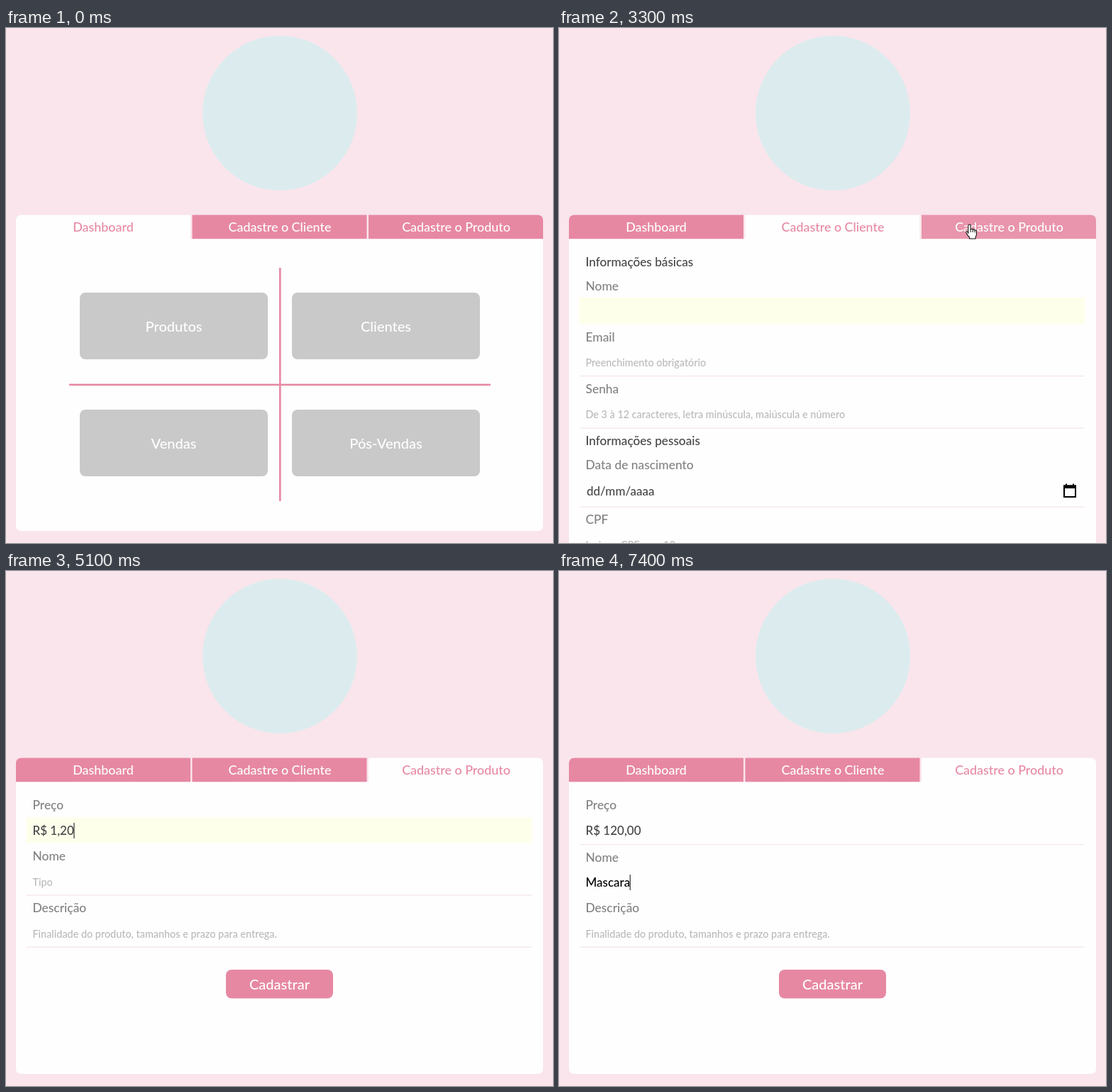
Animation of 771 by 726 pixels, one loop 8 s. Source, as an HTML page:

```html
<!DOCTYPE html>
<html lang="pt-BR">
<head>
<meta charset="utf-8">
<title>Cadastro</title>
<style>
  html, body { margin: 0; width: 100%; height: 100%; overflow: hidden; background: #fae5ec; }
  svg { display: block; width: 771px; height: 726px; }
  text { font-family: Lato, "Open Sans", sans-serif; font-size: 17.2px; font-weight: 500; white-space: pre; }
  .tab text { font-size: 17.9px; text-anchor: middle; }
  .big { font-size: 20px; text-anchor: middle; fill: #fff; }
  .head { fill: #444; }
  .label { fill: #828282; font-size: 17.4px; }
  .hint { fill: #b9b9b9; font-size: 14.4px; }
  .value { fill: #444; font-size: 17px; }
  .rule { fill: #f8e8ee; }
  .focus { fill: #feffeb; }
  .pink { fill: #e788a3; }
</style>
</head>
<body>
<svg id="stage" viewBox="0 0 771 726" xmlns="http://www.w3.org/2000/svg"></svg>
<script>
const LOOP = 8000, STEP = 100;
const PINK = '#e788a3', WHITE = '#fefefe';
const stage = document.getElementById('stage');

function add(parent, tag, attrs = {}, content) {
  const el = document.createElementNS('http://www.w3.org/2000/svg', tag);
  for (const k in attrs) el.setAttribute(k, attrs[k]);
  if (content) el.textContent = content;
  parent.appendChild(el);
  return el;
}
const group = (parent = stage) => add(parent, 'g');
const box = (g, cls, x, y, width, height, rx = 0) =>
  add(g, 'rect', { class: cls, x, y, width, height, rx });
const text = (g, cls, x, y, s) => add(g, 'text', { class: cls, x, y }, s);
const rule = (g, y) => box(g, 'rule', 29, y, 712, 1.4);
const focus = (g, y, h) => box(g, 'focus', 29, y, 712, h);
const show = (el, on) => el.setAttribute('display', on ? 'inline' : 'none');

// Header and panel
add(stage, 'circle', { cx: 386, cy: 120, r: 109, fill: '#dcecee' });
const panel = add(stage, 'path', { fill: WHITE });
const panelPath = bottom =>
  `M14 297H757V${bottom - 8}q0 8 -8 8H22q-8 0 -8 -8Z`;

// Tabs
const tabs = [
  ['Dashboard', 137, 'M14 297.2V271.5q0 -8 8 -8H260V297.2Z'],
  ['Cadastre o Cliente', 386, 'M262.5 263.5H508.5V297.2H262.5Z'],
  ['Cadastre o Produto', 634.5, 'M511 263.5H749q8 0 8 8V297.2H511Z']
].map(([name, x, d]) => {
  const g = add(stage, 'g', { class: 'tab' });
  return { bg: add(g, 'path', { d }), label: text(g, '', x, 287, name) };
});

// Dashboard
const dash = group();
box(dash, 'pink', 385, 338, 2.6, 329);
box(dash, 'pink', 89, 501.6, 594, 2.6);
[['Produtos', 104, 373], ['Clientes', 403, 373], ['Vendas', 104, 538], ['Pós-Vendas', 403, 538]]
  .forEach(([name, x, y]) => {
    add(dash, 'rect', { x, y, width: 265, height: 94, rx: 8, fill: '#c9c9c9' });
    text(dash, 'big', x + 132.5, y + 55, name);
  });

// Client form
const client = group();
focus(client, 380, 37.5);
[490, 563.5, 674.5].forEach(y => rule(client, y));
[
  ['head', 336, 'Informações básicas'],
  ['label', 370, 'Nome'],
  ['label', 442, 'Email'],
  ['hint', 477, 'Preenchimento obrigatório'],
  ['label', 515, 'Senha'],
  ['hint', 550, 'De 3 à 12 caracteres, letra minúscula, maiúscula e número'],
  ['head', 588, 'Informações pessoais'],
  ['label', 622, 'Data de nascimento'],
  ['value', 659, 'dd/mm/aaaa'],
  ['label', 699, 'CPF'],
  ['hint', 733.5, 'Insira o CPF com 12']
].forEach(([cls, y, s]) => text(client, cls, cls === 'value' ? 39 : 37.5, y, s));
add(client, 'path', {
  d: 'M712 645.5H728V661H712Z', fill: 'none', stroke: '#000', 'stroke-width': 2
});
add(client, 'path', { d: 'M711 644.5H729V649H711ZM714 642.5h2v3h-2ZM724 642.5h2v3h-2Z' });

// Product form
const product = group();
const priceFocus = focus(product, 347.5, 36);
const priceRule = rule(product, 385);
const nameFocus = focus(product, 420.5, 37.5);
const nameRule = rule(product, 456.3);
rule(product, 529.5);
text(product, 'label', 37.5, 336, 'Preço');
const price = text(product, 'value', 37.5, 372, 'R$ 0,00');
const nameLabel = text(product, 'label', 37.5, 408, 'Nome');
const nameHint = text(product, 'hint', 37.5, 443.5, 'Tipo');
const nameValue = text(product, 'value', 37.5, 445, 'Mascara');
nameValue.style.fill = '#000';
text(product, 'label', 37.5, 481, 'Descrição');
text(product, 'hint', 37.5, 516.5, 'Finalidade do produto, tamanhos e prazo para entrega.');
box(product, 'pink', 310, 562, 151, 40.5, 8);
text(product, 'big', 385.5, 589.5, 'Cadastrar');

// Suggestion list
const list = group(product);
add(list, 'rect', { x: 28.5, y: 460.5, width: 212, height: 57, rx: 4, fill: '#fff', stroke: '#d4d4d4' });
const pick = add(list, 'rect', { x: 29, y: 473, width: 211, height: 31, fill: '#e8e8e8' });
add(list, 'text', { x: 38, y: 494, fill: '#222', style: 'font-size:14.6px' }, 'Mascara');

const caret = add(stage, 'rect', { width: 1.2, height: 22, fill: '#333' });

// Pointers, both with the hot spot at 0,0
const ink = { fill: '#fff', stroke: '#111', 'stroke-width': 1.1, 'stroke-linejoin': 'round' };
const arrow = add(stage, 'path', { ...ink, d: 'M0 0V16L3.8 12.5L6.4 18.6L9 17.5L6.4 11.6H11.5Z' });
const hand = group();
add(hand, 'path', {
  ...ink,
  d: 'M-1.7 13V2Q-1.7 .5 0 .5T1.7 2V8Q1.9 6.6 3.2 6.7T4.7 8.2Q5 7.2 6.2 7.4T7.5 9' +
     'Q8 8.2 9 8.6T9.9 10.4V14.5Q9.8 16.4 8.6 18V20.5H0V18.4Q-2.6 15.8 -4.5 12.4' +
     'Q-5.2 10.8 -4 10.3T-1.7 13Z'
});
add(hand, 'path', { d: 'M1.7 8V11.5M4.7 8.5V11.5M7.5 9.2V11.8', stroke: '#111', fill: 'none' });

const prices = [
  [0, 'R$ 0,00'], [4700, 'R$ 0,01'], [5000, 'R$ 0,12'], [5100, 'R$ 1,20'],
  [5400, 'R$ 12,00'], [5500, 'R$ 120,00']
];
const carets = [
  [2400, 3000, 'client'], [3400, 3600, 'client'],
  [3600, 4200, 'price'], [4700, 6000, 'price'],
  [6000, 6500, 'hint'], [7400, 8000, 'name']
];
// start, end, from x, y, to x, y
const moves = [
  [1200, 1800, 30, 1, 374.5, 271.5],
  [2900, 3300, 374.5, 271.5, 578.5, 276.5]
];

function pointerAt(t) {
  if (t < 1200 || t >= 4000) return null;
  const [t0, t1, x0, y0, x1, y1] = moves.filter(m => t >= m[0]).pop();
  const p = Math.min(1, (t - t0) / (t1 - t0));
  const e = 1 - (1 - p) ** 2;
  return { x: x0 + (x1 - x0) * e, y: y0 + (y1 - y0) * e };
}

function drawCaret(t) {
  const c = carets.find(([a, b]) => t >= a && t < b);
  show(caret, c);
  if (!c) return;
  const after = el => 37 + el.getComputedTextLength();
  const [x, y] = {
    client: () => [37.2, 388.5],
    price: () => [after(price), 355],
    hint: () => [37.2, 428],
    name: () => [after(nameValue), 428]
  }[c[2]]();
  caret.setAttribute('x', x);
  caret.setAttribute('y', y);
}

function draw(now) {
  const t = Math.floor(now % LOOP / STEP) * STEP;
  const page = t < 2400 ? 0 : t < 3600 ? 1 : 2;
  [dash, client, product].forEach((g, i) => show(g, i === page));
  panel.setAttribute('d', panelPath(page === 1 ? 760 : 709));

  const pos = pointerAt(t);
  const over = !pos || pos.y < 263.5 ? -1 : pos.x < 261 ? 0 : pos.x < 510 ? 1 : 2;
  tabs.forEach(({ bg, label }, i) => {
    const active = i === page;
    bg.setAttribute('fill', active ? WHITE : PINK);
    bg.setAttribute('opacity', i === over && !active ? 0.85 : 1);
    label.setAttribute('fill', active ? PINK : '#fff');
  });
  show(arrow, pos && over < 0);
  show(hand, pos && over >= 0);
  if (pos) [arrow, hand].forEach(el => el.setAttribute('transform', `translate(${pos.x} ${pos.y})`));

  const onName = t >= 6000, filled = t >= 7000;
  price.textContent = prices.filter(p => t >= p[0]).pop()[1];
  show(priceFocus, !onName);
  show(priceRule, onName);
  show(nameFocus, onName && !filled);
  show(nameRule, !onName);
  nameLabel.setAttribute('y', onName ? 409.5 : 408);
  nameHint.setAttribute('y', onName ? 445 : 443.5);
  show(nameHint, !filled);
  show(nameValue, filled);
  show(list, t >= 6500 && t < 7400);
  show(pick, filled);
  drawCaret(t);
}

const start = performance.now();
function tick() {
  draw(performance.now() - start);
  requestAnimationFrame(tick);
}
tick();
</script>
</body>
</html>
```
